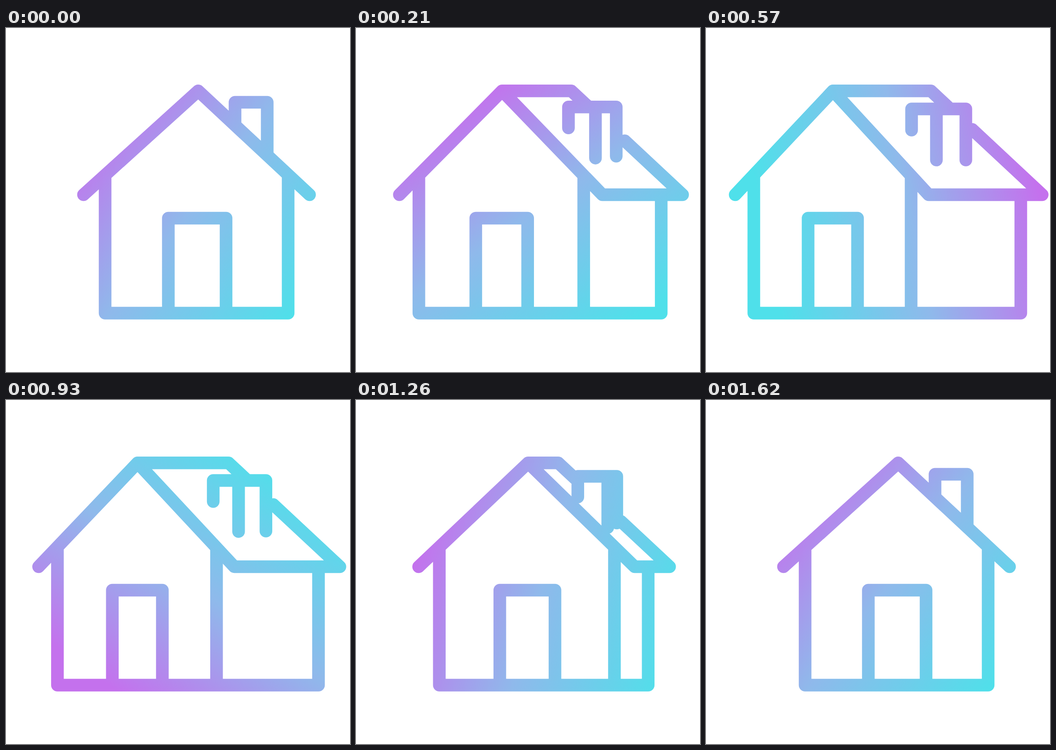
An HTML page for the animation above (3650 ms loop, 748 px wide and 748 px high).

```html
<!DOCTYPE html>
<html lang="en">
<head>
<meta charset="utf-8">
<title>House</title>
<style>
  html, body { margin: 0; width: 100%; height: 100%; overflow: hidden; background: #fff; }
  svg { display: block; width: 100vw; height: 100vh; }
  path { fill: none; stroke: url(#tint); stroke-width: 27.5; stroke-linecap: round; stroke-linejoin: round; }
</style>
</head>
<body>
<svg viewBox="0 0 748 748">
  <defs>
    <linearGradient id="tint" gradientUnits="userSpaceOnUse" x1="125" y1="395" x2="725" y2="395">
      <stop offset="0" stop-color="#c471ed"/>
      <stop offset=".47" stop-color="#8fb9eb"/>
      <stop offset="1" stop-color="#4fe0ea"/>
    </linearGradient>
  </defs>
  <path id="house"/>
</svg>
<script>
  const LOOP = 3650, STEP = 30, LAST = 54;
  const house = document.getElementById('house');
  const tint = document.getElementById('tint');

  // Timing curve with handles (a, 0) and (b, 1)
  function ease(x, a, b) {
    if (x <= 0) return 0;
    if (x >= 1) return 1;
    let lo = 0, hi = 1, s = 0.5;
    for (let i = 0; i < 30; i++) {
      s = (lo + hi) / 2;
      const r = 1 - s;
      if (3 * s * r * r * a + 3 * s * s * r * b + s * s * s < x) lo = s;
      else hi = s;
    }
    return s * s * (3 - 2 * s);
  }

  // 0 = seen from the front, 1 = turned to show the side
  function turn(n) {
    return ease(n / 19, 0.333, 0.05) - ease((n - 21.5) / 26.2, 0.92, 0.667);
  }

  const line = (...pts) => 'M' + pts.map(p => p.map(v => v.toFixed(2)).join(' ')).join('L');

  function outline(p) {
    const mix = (a, b) => a + (b - a) * p;
    const top = 136.75, eave = 362.5, floor = 620, wallTop = 322, doorTop = 413.5;

    const apex = mix(418, 276), ridge = mix(418, 489);
    const eaveL = mix(168.5, 63.5), eaveF = mix(660, 484), eaveB = mix(660, 731);
    const wallL = mix(215.5, 104), wallF = mix(613.5, 446), wallB = mix(613.5, 684.5);
    const doorL = mix(353, 222), doorR = mix(478.5, 329.5);
    const stackL = mix(498, 447), stackM = mix(568, 501), stackR = mix(568, 565);
    const stackTop = mix(161.5, 176);

    // Point on the rear slope at height y
    const slope = y => [ridge + (y - top) / (eave - top) * (eaveB - ridge), y];

    return [
      line([eaveL, eave], [apex, top], [eaveF, eave], [eaveB, eave], slope(266.8 + 7.5 * p - 53.7 * p * p)),
      line([apex, top], [ridge, top], slope(171)),
      line([wallL, wallTop], [wallL, floor], [wallB, floor], [wallB, eave]),
      line([wallF, wallTop], [wallF, floor]),
      line([doorL, floor], [doorL, doorTop], [doorR, doorTop], [doorR, floor]),
      line([stackL, mix(206, 222)], [stackL, stackTop], [stackR, stackTop], [stackR, mix(259, 287)]),
      line([stackM, stackTop], [stackM, mix(273, 287)])
    ].join('');
  }

  const start = performance.now();

  function draw() {
    const t = Math.max(0, performance.now() - start) % LOOP;
    const n = Math.min(LAST, Math.floor(t / STEP));
    const angle = 38 + 360 * ease(n / LAST, 0.36, 0.44);
    house.setAttribute('d', outline(turn(n)));
    tint.setAttribute('gradientTransform', `rotate(${angle.toFixed(2)} 425 395)`);
    requestAnimationFrame(draw);
  }
  draw();
</script>
</body>
</html>
```
